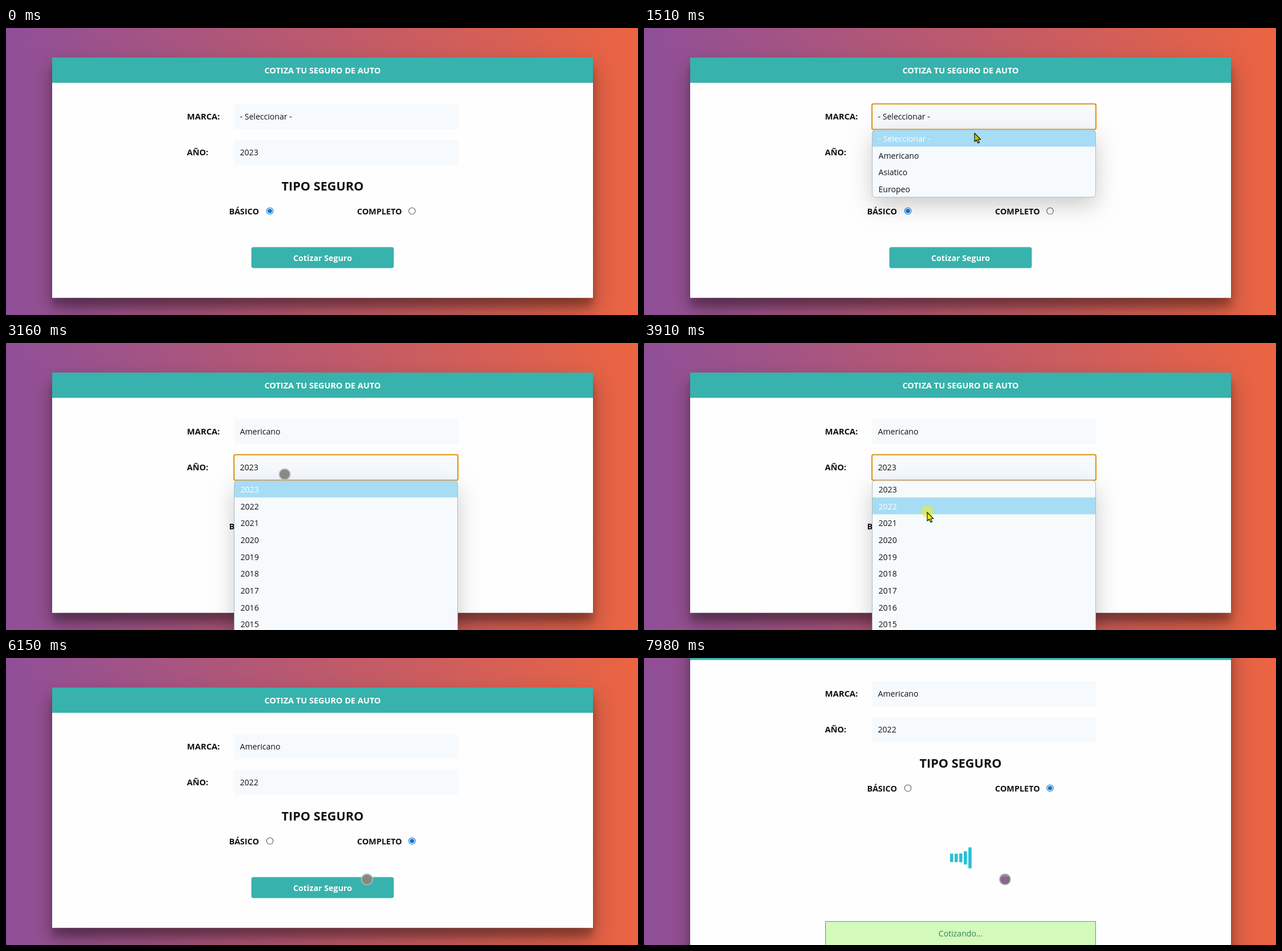
Write an HTML page with a canvas that moves like this. It is 1109 px wide and 505 px high and loops after 8 s.

```html
<!DOCTYPE html>
<html lang="es">
<head>
<meta charset="utf-8">
<title>Cotiza tu seguro de auto</title>
<style>
  html, body { margin: 0; width: 1109px; height: 505px; overflow: hidden; }
  canvas { display: block; }
</style>
</head>
<body>
<canvas id="stage" width="1109" height="505"></canvas>
<script>
const W = 1109, H = 505, LOOP = 8000;
const ctx = document.getElementById('stage').getContext('2d');
const FONT = '"Open Sans", "Noto Sans", sans-serif';
const TEAL = '#38b2ac', FIELD = '#f6fafd', INK = '#111';
const ROW = 29.7;
const BRANDS = ['- Seleccionar -', 'Americano', 'Asiatico', 'Europeo'];
const YEARS = Array.from({ length: 20 }, (_, i) => String(2023 - i));

// Moments of the scenario, in ms
const T = {
  enter: 390, openBrand: 1140, hoverBrand: 2080, pickBrand: 2460,
  openYear: 2690, hoverYear: 3820, pickYear: 4010, blur: 5190,
  pickType: 5480, submit: 6155, scroll: 6465
};

// Pointer moves: start, end, destination
const START = [926, 454];
const MOVES = [
  [390, 910, 588, 160], [1190, 1480, 580, 185], [1850, 2320, 556, 225],
  [2750, 3160, 489, 231], [3350, 3630, 497, 298], [4060, 4580, 640, 386],
  [4630, 5150, 718, 331], [5620, 5980, 633.5, 389.5]
];

const clamp = v => Math.max(0, Math.min(1, v));
const smooth = v => (v = clamp(v), v * v * (3 - 2 * v));
const between = (t, a, b) => t >= a && t < b;

// CSS "ease" curve
function ease(p) {
  const bez = (u, a, b) => 3 * u * (1 - u) ** 2 * a + 3 * u * u * (1 - u) * b + u ** 3;
  let lo = 0, hi = 1;
  for (let i = 0; i < 20; i++) {
    const mid = (lo + hi) / 2;
    if (bez(mid, .25, .25) < p) lo = mid; else hi = mid;
  }
  return bez(lo, .1, 1);
}

function rect(x, y, w, h, color) {
  ctx.fillStyle = color;
  ctx.fillRect(x, y, w, h);
}

function round(x, y, w, h, r) {
  ctx.beginPath();
  ctx.roundRect(x, y, w, h, r);
}

function disc(x, y, r, color) {
  ctx.beginPath();
  ctx.arc(x, y, r, 0, Math.PI * 2);
  ctx.fillStyle = color;
  ctx.fill();
}

function text(str, x, y, { size = 14.1, weight = 400, color = INK, align = 'left' } = {}) {
  ctx.font = `${weight} ${size}px ${FONT}`;
  ctx.fillStyle = color;
  ctx.textAlign = align;
  ctx.fillText(str, x, y);
}

function shadow(color, blur, dy) {
  ctx.shadowColor = color;
  ctx.shadowBlur = blur;
  ctx.shadowOffsetY = dy;
}

function background() {
  const g = ctx.createLinearGradient(0, 0, W, 0);
  g.addColorStop(0, '#8f4f98');
  g.addColorStop(1, '#eb6441');
  rect(0, 0, W, H, g);
}

function card(height) {
  ctx.save();
  shadow('rgba(0,0,0,.3)', 38, 19);
  rect(81, 52, 949, height, '#fff');
  shadow('rgba(0,0,0,.22)', 12, 15);
  rect(81, 52, 949, height, '#fff');
  ctx.restore();
  rect(81, 52, 949, height, '#fefefe');
  rect(81, 52, 949, 44.5, TEAL);
  text('COTIZA TU SEGURO DE AUTO', 555.5, 80, { size: 14.5, weight: 700, color: '#fff', align: 'center' });
}

function field(label, value, y, size, focused) {
  text(label, 317.5, y + 27, { size, weight: 700 });
  rect(400, y, 393, 44, FIELD);
  text(value, 410.5, y + 27);
  if (focused) {
    round(400, y - .5, 393, 45, 2.5);
    ctx.strokeStyle = '#e0920f';
    ctx.lineWidth = 2;
    ctx.stroke();
  }
}

function radio(label, x, dotX, on) {
  text(label, x, 328, { size: 14.4, weight: 700 });
  ctx.beginPath();
  ctx.arc(dotX, 322, 5.7, 0, Math.PI * 2);
  ctx.fillStyle = '#fff';
  ctx.fill();
  ctx.strokeStyle = on ? '#0a74cf' : '#5f5f5f';
  ctx.lineWidth = 1.1;
  ctx.stroke();
  if (on) disc(dotX, 322, 3.8, '#0a74cf');
}

function spinner(t) {
  const base = (t - T.submit) / 1200 + 1;
  for (let i = 0; i < 5; i++) {
    const p = (base - i / 12) % 1;
    const k = p < .2 ? ease(p / .2) : p < .4 ? 1 - ease((p - .2) / .2) : 0;
    const h = 37 * (.4 + .6 * k);
    rect(537 + i * 8.05, 444.7 - h / 2, 5.6, h, '#27c0d6');
  }
}

function notice() {
  rect(318, 556, 475, 44, '#d3f9bb');
  ctx.strokeStyle = '#4caf27';
  ctx.lineWidth = 1;
  ctx.strokeRect(318.5, 556.5, 474, 43);
  text('Cotizando...', 555.5, 583, { color: '#2f855a', align: 'center' });
}

function list(items, y, active, alpha) {
  const h = items.length * ROW;
  ctx.save();
  ctx.globalAlpha = alpha;
  round(400.5, y, 392, h, 6);
  ctx.save();
  shadow('rgba(0,0,0,.2)', 38, 14);
  ctx.fillStyle = FIELD;
  ctx.fill();
  ctx.restore();
  ctx.save();
  ctx.clip();
  rect(400, y + active * ROW, 393, ROW, '#a6dcf4');
  items.forEach((s, i) => text(s, 411.5, y + i * ROW + 20.8, { color: i === active ? '#fff' : INK }));
  ctx.restore();
  round(400.5, y, 392, h, 6);
  ctx.strokeStyle = '#b4b8bb';
  ctx.lineWidth = 1;
  ctx.stroke();
  ctx.restore();
}

function pointerAt(t) {
  let [x, y] = START;
  for (const [a, b, nx, ny] of MOVES) {
    if (t < a) break;
    const k = smooth((t - a) / (b - a));
    x += (nx - x) * k;
    y += (ny - y) * k;
  }
  return [x, y];
}

function arrow(x, y, color) {
  const pts = [[0, 0], [0, 15], [3.4, 12], [6, 17.6], [8.6, 16.4], [6.2, 11.2], [10.8, 11]];
  ctx.beginPath();
  pts.forEach(([px, py]) => ctx.lineTo(x + px, y + py));
  ctx.closePath();
  ctx.fillStyle = color;
  ctx.fill();
  ctx.strokeStyle = '#1a1a10';
  ctx.lineWidth = 1.2;
  ctx.lineJoin = 'round';
  ctx.stroke();
}

function touch(x, y, tinted) {
  disc(x, y, 10.6, tinted ? '#c2c4c6' : 'rgba(190,190,184,.85)');
  if (!tinted) return disc(x, y, 8.8, 'rgba(122,122,116,.8)');
  disc(x, y, 8.8, '#8c6593');
  ctx.save();
  ctx.beginPath();
  ctx.rect(x - 11, y - 11, 22, 6.5);
  ctx.clip();
  disc(x, y, 8.8, '#8d8d87');
  ctx.restore();
}

function pointer(t) {
  if (t < T.enter) return;
  const [x, y] = pointerAt(t);
  const overBrand = between(t, T.openBrand, T.pickBrand) && y > 179;
  const overYear = between(t, T.openYear, T.pickYear) && y > 242;
  const click = between(t, T.hoverYear, T.pickYear);
  if (click) disc(x, y - 1, 11, 'rgba(238,240,30,.55)');
  if (overBrand || overYear) arrow(x, y, overYear ? '#e2f21c' : '#b9c400');
  else touch(x, y, t >= T.submit);
}

function draw(t) {
  const scroll = 93 * smooth((t - T.scroll) / 280);
  const sent = t >= T.submit;
  const full = t >= T.pickType;

  background();
  ctx.save();
  ctx.translate(0, -Math.round(scroll));
  card(sent ? 648 : 422.5);
  field('MARCA:', t < T.pickBrand ? BRANDS[0] : BRANDS[1], 134, 14.8, between(t, T.openBrand, T.openYear));
  field('AÑO:', t < T.pickYear ? YEARS[0] : YEARS[1], 197, 14.5, between(t, T.openYear, T.blur));
  text('TIPO SEGURO', 555.5, 285.5, { size: 21.7, weight: 700, align: 'center' });
  radio('BÁSICO', 391.5, 463, !full);
  radio('COMPLETO', 616, 712.5, full);
  if (sent) {
    spinner(t);
    notice();
  } else {
    round(430.5, 385.5, 250, 37, 4);
    ctx.fillStyle = TEAL;
    ctx.fill();
    text('Cotizar Seguro', 555.5, 409.5, { size: 14.3, weight: 700, color: '#fff', align: 'center' });
  }
  ctx.restore();

  if (between(t, T.openBrand, T.pickBrand)) {
    list(BRANDS, 179, t < T.hoverBrand ? 0 : 1, clamp((t - T.openBrand + 40) / 180));
  }
  if (between(t, T.openYear, T.pickYear)) {
    list(YEARS, 242, t < T.hoverYear ? 0 : 1, clamp((t - T.openYear + 40) / 180));
  }
  if (t >= T.scroll) {
    ctx.globalAlpha = 1 - clamp((t - 7400) / 300);
    rect(1106, scroll * .66, 3, 338, '#8f7f8a');
    ctx.globalAlpha = 1;
  }
  pointer(t);
}

function tick() {
  draw(performance.now() % LOOP);
  requestAnimationFrame(tick);
}
tick();
</script>
</body>
</html>
```
